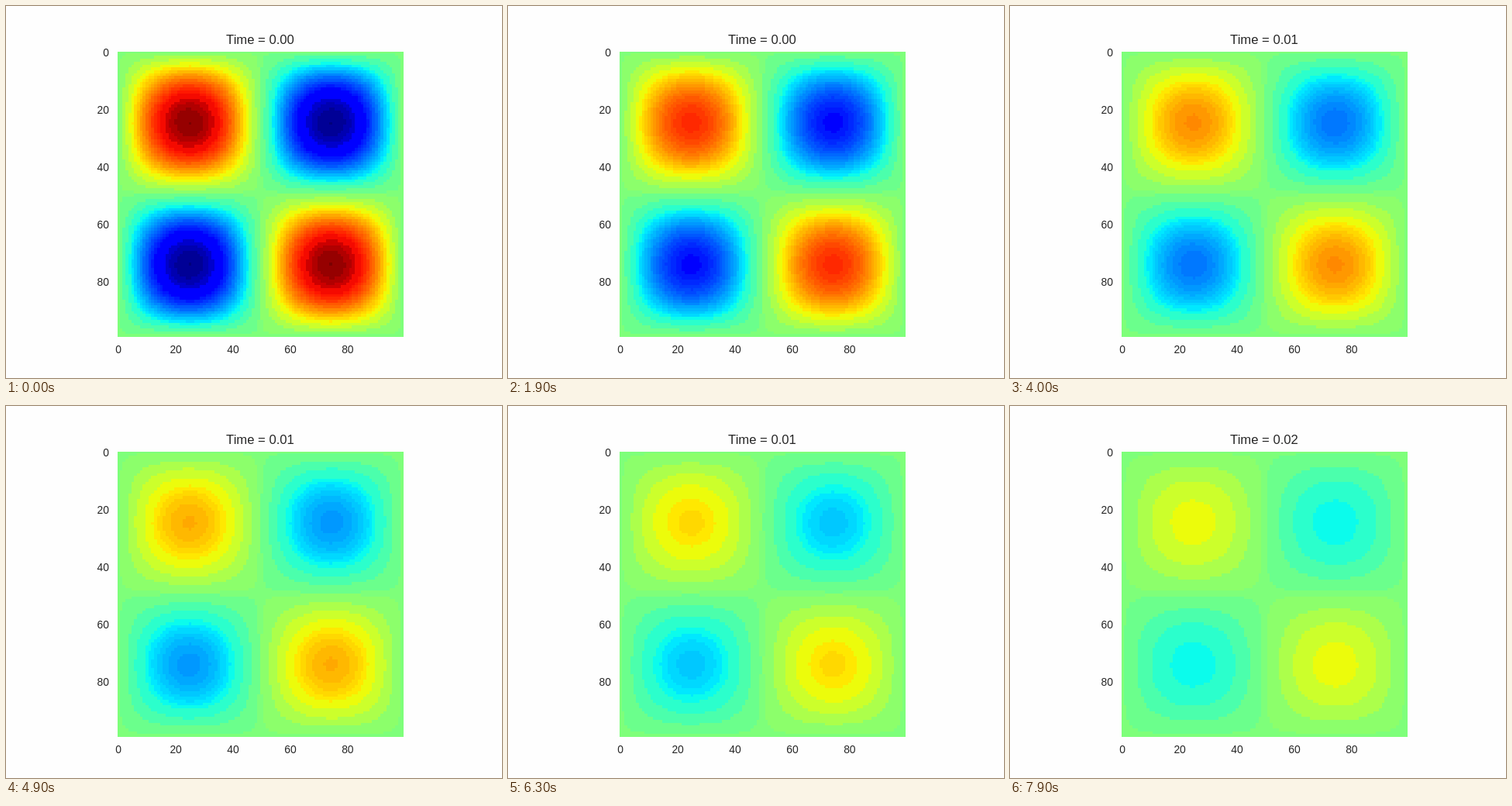
Animation of 640 by 480 pixels, one loop 8000 ms. Source, as an HTML page with a canvas:

```html
<!DOCTYPE html>
<html lang="en">
<head>
<meta charset="utf-8">
<title>Heat diffusion</title>
<style>
  html, body { margin: 0; width: 640px; height: 480px; overflow: hidden; background: #fefefe; }
  canvas, svg { position: absolute; left: 0; top: 0; width: 640px; height: 480px; }
  text { font: 13.89px "Liberation Sans", Arial, sans-serif; fill: #262626; }
  #title { font-size: 16.67px; text-anchor: middle; }
  .x { text-anchor: middle; }
  .y { text-anchor: end; }
</style>
</head>
<body>
<canvas id="plot" width="640" height="480"></canvas>
<svg id="labels" viewBox="0 0 640 480">
  <text id="title" x="328" y="49">Time = 0.00</text>
</svg>
<script>
const N = 100, CELL = 3.7, LEFT = 143, TOP = 57;
const STEP_MS = 100, STEPS = 80;
const DT = 0.0002, DECAY = 0.0162;

const title = document.getElementById('title');
const labels = document.getElementById('labels');
const ctx = document.getElementById('plot').getContext('2d', { alpha: true });
ctx.beginPath();
ctx.rect(144, 59, 369, 368);
ctx.clip();

function addLabel(cls, x, y, value) {
  const el = document.createElementNS('http://www.w3.org/2000/svg', 'text');
  el.setAttribute('class', cls);
  el.setAttribute('x', x);
  el.setAttribute('y', y);
  el.textContent = value;
  labels.append(el);
}
for (let i = 0; i < 5; i++) {
  addLabel('x', 145.2 + 73.92 * i, 448, 20 * i);
  addLabel('y', 133, 65 + 74 * i, 20 * i);
}

const band = (c, size, offset) => Math.floor(c / size) * size + offset;

// Rainbow scale over -1..1, in flat bands
function colour(u) {
  const hot = u >= 0;
  const v = 0.5 + u / 2;
  const m = 0.5 + Math.abs(u) / 2;
  const rise = 255 * (m - 0.35) / 0.31;
  const green = 255 * (hot ? (0.91 - v) / 0.27 : (v - 0.125) / 0.25);
  let main = 255, g = 255, rest = 0;

  if (rise < 128) return 'rgb(126,255,122)';
  if (rise < 255 && green > 240) {
    main = band(rise, 32, 12);
    rest = 247 - main;
    if (main > 230) g = 252;
  } else if (green > 16) {
    g = Math.min(band(green, 16, 8), 240);
  } else {
    const dark = 255 * (1 - 0.5 * (m - 0.89) / 0.11);
    g = 0;
    if (dark < 209) main = 128 + band(dark - 128, 27, 22);
    else if (hot) { main = 245; g = 10; }
  }
  return hot ? `rgb(${main},${g},${rest})` : `rgb(${rest},${g},${main})`;
}

const wave = Array.from({ length: N }, (_, i) => Math.sin(2 * Math.PI * i / (N - 1)));
const edge = (start, i) => Math.round(start + CELL * i);

function draw(step) {
  const amp = Math.exp(-DECAY * step);
  for (let j = 0; j < N; j++) {
    const y = edge(TOP, j), h = edge(TOP, j + 1) - y;
    for (let i = 0; i < N; i++) {
      const x = edge(LEFT, i);
      ctx.fillStyle = colour(amp * wave[i] * wave[j]);
      ctx.fillRect(x, y, edge(LEFT, i + 1) - x, h);
    }
  }
  title.textContent = 'Time = ' + (step * DT).toFixed(2);
}

const start = performance.now();
let shown = -1;
function tick() {
  const step = Math.floor((performance.now() - start) / STEP_MS) % STEPS;
  if (step !== shown) draw(shown = step);
  requestAnimationFrame(tick);
}
tick();
</script>
</body>
</html>
```
